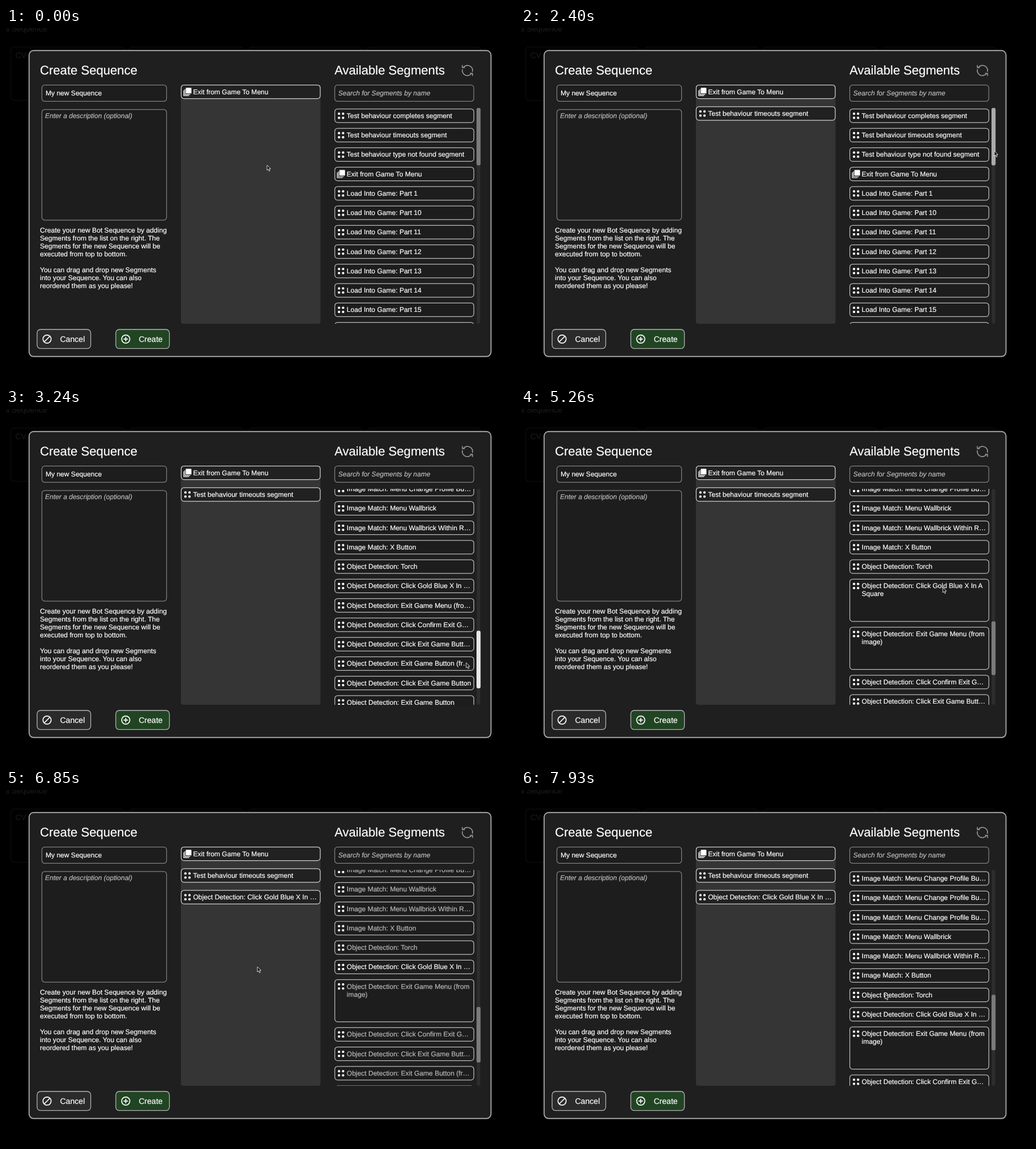
Recreate the animation shown at these times as an HTML page with a canvas. Size 899 by 623 pixels, loop 7990 ms.

```html
<!DOCTYPE html>
<html lang="en">
<head>
<meta charset="utf-8">
<title>Create Sequence</title>
<style>
  html, body { margin: 0; width: 100%; height: 100%; overflow: hidden; background: #000; }
  canvas { display: block; width: 899px; height: 623px; }
</style>
</head>
<body>
<canvas id="stage" width="899" height="623"></canvas>
<script>
const ctx = document.getElementById('stage').getContext('2d');
const LOOP = 7990;
const FONT = '"Liberation Sans", Arial, sans-serif';
const SIZE = 12.05, CARD = 24, PITCH = 34.25, EXTRA = 50.5;
const LIST = { x: 580.3, y: 141, height: 381, first: 154.8 };
const PANEL = { x: 309, y: 100, first: 112.6, pitch: 38.25 };
const LIGHT = '#fff', EDGE = '#818181', FIELD = '#1d1d1d';

const parts = Array.from({ length: 19 }, (_, i) => String(i + 1)).sort();
const segments = [
  'Test behaviour completes segment',
  'Test behaviour timeouts segment',
  'Test behaviour type not found segment',
  'Exit from Game To Menu',
  ...parts.map(n => 'Load Into Game: Part ' + n),
  ...Array(5).fill('Image Match: Menu Change Profile Bu…'),
  'Image Match: Menu Wallbrick',
  'Image Match: Menu Wallbrick Within R…',
  'Image Match: X Button',
  'Object Detection: Torch',
  'Object Detection: Click Gold Blue X In …',
  'Object Detection: Exit Game Menu (fro…',
  'Object Detection: Click Confirm Exit G…',
  'Object Detection: Click Exit Game Butt…',
  'Object Detection: Exit Game Button (fr…',
  'Object Detection: Click Exit Game Button',
  ...Array(4).fill('Object Detection: Exit Game Button')
];
const TIMEOUTS = segments.indexOf('Test behaviour timeouts segment');
const GOLD = segments.findIndex(s => s.includes('Gold'));

const expanded = [
  { item: GOLD, start: 5130, end: 6380, lines: ['Object Detection: Click Gold Blue X In A', 'Square'] },
  { item: GOLD + 1, start: 4190, end: LOOP, lines: ['Object Detection: Exit Game Menu (from', 'image)'] }
];
const drags = [
  { item: TIMEOUTS, start: 540, end: 1270, slot: 1, dx: 8.5 },
  { item: GOLD, start: 6380, end: 6780, slot: 2, dx: -8.5 }
];
const barDrag = { start: 2480, end: 2910, distance: 938.5 };
const wheel = { start: 7640, end: 7910, distance: -83.5 };

// Pointer strokes: start, end, and where the tip comes to rest.
const home = [461, 242];
const moves = [
  [120, 500, 695, 190],
  [560, 940, 478, 212],
  [1300, 1740, 823, 189],
  [1740, 2100, 841, 188],
  [2280, 2400, 836, 217],
  [barDrag.start, barDrag.end, 836, 466],
  [3150, 3480, 711, 368],
  [3600, 3780, 711, 354],
  [4800, 5200, 745, 315],
  [5440, 5850, 675, 478],
  [5850, 6210, 712, 315],
  [6380, 6800, 444, 312],
  [7030, 7210, 693, 40],
  [7340, 7510, 643, 360]
];

const ramp = (t, a, b) => Math.max(0, Math.min(1, (t - a) / (b - a)));
const ease = (t, a, b) => { const p = ramp(t, a, b); return p * p * (3 - 2 * p); };
const during = (t, span) => t >= span.start && t < span.end;
const gray = v => `rgb(${v},${v},${v})`;

function cursorAt(t) {
  return moves.reduce(([x, y], [a, b, toX, toY]) => {
    const p = ease(t, a, b);
    return [x + (toX - x) * p, y + (toY - y) * p];
  }, home);
}
const scrollAt = t => [barDrag, wheel].reduce((sum, s) => sum + s.distance * ease(t, s.start, s.end), 0);

function box(x, y, w, h, r, fill, stroke, width = 1.25) {
  ctx.beginPath();
  ctx.roundRect(x, y, w, h, r);
  if (fill) { ctx.fillStyle = fill; ctx.fill(); }
  if (stroke) { ctx.strokeStyle = stroke; ctx.lineWidth = width; ctx.stroke(); }
}
// y is the middle of the line; a hairline stroke gives the slightly heavier weight.
function text(s, x, y, size = SIZE, color = LIGHT, style = '') {
  const base = y + size * .3465;
  ctx.font = `${style} ${size}px ${FONT}`;
  ctx.fillStyle = ctx.strokeStyle = color;
  ctx.lineWidth = .2;
  ctx.fillText(s, x, base);
  ctx.strokeText(s, x, base);
}
function line(points, color, width) {
  ctx.beginPath();
  points.forEach(([x, y]) => ctx.lineTo(x, y));
  ctx.strokeStyle = color;
  ctx.lineWidth = width;
  ctx.stroke();
}
function arc(x, y, r, from, to, color, width) {
  ctx.beginPath();
  ctx.arc(x, y, r, from, to);
  ctx.strokeStyle = color;
  ctx.lineWidth = width;
  ctx.stroke();
}

function dots(x, y, color) {
  for (const dx of [-3.6, 3.6]) for (const dy of [-3.6, 3.6])
    box(x + dx - 2, y + dy - 2, 4, 4, 1.5, color);
}
function stack(x, y, color) {
  box(x - 3, y - 7, 10, 10, 1.2, color);
  for (const d of [0, 2])
    line([[x - 4.6 - d, y - 4.6 + d], [x - 4.6 - d, y + 4.7 + d], [x + 4.8 - d, y + 4.7 + d]], color, 1.2);
}

// A segment card; y is the middle of its first line.
function card(x, y, lines, { h = CARD, fill = FIELD, border = '#bcbcbc', ink = 255, icon = 255 } = {}) {
  box(x + .4, y - CARD / 2, 245.6, h, 5, fill, border);
  (lines[0].startsWith('Exit from') ? stack : dots)(x + 11.5, y, gray(icon));
  lines.forEach((s, i) => text(s, x + 21.5, y + i * 14, SIZE, gray(ink)));
}

function background() {
  ctx.fillStyle = '#000';
  ctx.fillRect(0, 0, 899, 623);
  text('a Sequence', -2, 1.5, 14, '#1b1b1b');
  for (let i = 0; i < 4; i++) box(8.5 + i * 210, 33.5, 200, 94, 6, null, '#0e0e0e');
  text('CV', 16.5, 48, 14, '#191919');
}

function refreshIcon(x, y) {
  const color = '#999', width = 1.6;
  for (const turn of [0, Math.PI]) {
    ctx.save();
    ctx.translate(x, y);
    ctx.rotate(turn);
    arc(0, 0, 9, Math.PI * 1.2, Math.PI * 2.08, color, width);
    line([[-9, -9.5], [-9, -5], [-4.5, -5]], color, width);
    ctx.restore();
  }
}

function button(x, label, fill, drawIcon) {
  box(x, 532, 94.7, 33.7, 6, fill, '#b4b4b4', 1.3);
  arc(x + 17.6, 549, 7.2, 0, 7, LIGHT, 1.7);
  drawIcon(x + 17.6, 549);
  text(label, x + 40.5, 549, 14.1);
}

function dialog() {
  box(40.8, 39.8, 815.8, 540, 8, '#1f1f1f', '#a6a6a6', 1.9);
  text('Create Sequence', 60, 74.8, 22.1);
  text('Available Segments', 580.2, 74.8, 22.1);
  refreshIcon(815, 75);

  box(63.4, 100.7, 220.2, 28.7, 5, FIELD, EDGE);
  text('My new Sequence', 70, 115);
  box(63.4, 143.8, 220.2, 195.2, 5, FIELD, EDGE);
  text('Enter a description (optional)', 69, 155, SIZE, '#bbb', 'italic');
  box(580.6, 100.7, 245.6, 28.7, 5, FIELD, EDGE);
  text('Search for Segments by name', 586.7, 115, SIZE, '#bbb', 'italic');

  ['Create your new Bot Sequence by adding', 'Segments from the list on the right. The',
   'Segments for the new Sequence will be', 'executed from top to bottom.', '',
   'You can drag and drop new Segments', 'into your Sequence. You can also',
   'reordered them as you please!'
  ].forEach((s, i) => text(s, 60, 357.2 + i * 13.93, 12.1));

  button(54.9, 'Cancel', '#2b2b2b', (x, y) => line([[x - 5, y + 5], [x + 5, y - 5]], LIGHT, 1.7));
  button(193.9, 'Create', '#214523', (x, y) => {
    line([[x - 4, y], [x + 4, y]], LIGHT, 1.7);
    line([[x, y - 4], [x, y + 4]], LIGHT, 1.7);
  });
}

function sequence(t, [cursorX]) {
  box(PANEL.x, PANEL.y, 246.5, 422, 4, '#353535');
  const style = { fill: '#212121', border: '#d0d0d0' };
  card(PANEL.x, PANEL.first, ['Exit from Game To Menu'], style);
  for (const d of drags) {
    const y = PANEL.first + d.slot * PANEL.pitch;
    if (t >= d.end) card(PANEL.x, y, [segments[d.item]], style);
    else if (during(t, d) && cursorX < LIST.x) {
      ctx.setLineDash([7, 3]);
      box(PANEL.x + .4, y - CARD / 2, 245.6, CARD, 5, '#2b2b2b', '#c4c4c4');
      ctx.setLineDash([]);
    }
  }
}

function scrollbar(t, scroll, openCount) {
  const content = segments.length * PITCH - 10 + openCount * EXTRA;
  const height = LIST.height ** 2 / content;
  const top = LIST.y + (LIST.height - height) * scroll / (content - LIST.height);
  const hover = 48 * ramp(t, 2300, 2390), press = 60 * ramp(t, 2480, 2570);
  const shade = 122 + (hover + press) * (1 - ramp(t, 3260, 3430));
  box(831.5, LIST.y, 6, LIST.height, 3, '#2d2d2d');
  box(831, top, 7.2, height, 3, gray(Math.round(shade)));
}

function segmentList(t) {
  const drag = drags.find(d => t >= d.start && t < d.end + 150);
  const held = drag && during(t, drag);
  const dim = drag ? ramp(t, drag.start, drag.start + 120) * (1 - ramp(t, drag.end, drag.end + 150)) : 0;
  const scroll = scrollAt(t);
  const open = expanded.filter(e => during(t, e));

  ctx.save();
  ctx.beginPath();
  ctx.rect(579, LIST.y, 250, LIST.height);
  ctx.clip();
  let y = LIST.first - scroll;
  segments.forEach((name, i) => {
    const wide = open.find(e => e.item === i);
    const h = CARD + (wide ? EXTRA : 0);
    const faded = drag && drag.item !== i;
    const ink = faded ? Math.round(255 - 133 * dim) : 255;
    card(LIST.x, y, wide ? wide.lines : [name], { h, ink, icon: held ? ink : 255 });
    y += PITCH - CARD + h;
  });
  ctx.restore();
  scrollbar(t, scroll, open.length);
}

function ghost(t, [x, y]) {
  const drag = drags.find(d => during(t, d));
  if (!drag) return;
  ctx.save();
  ctx.translate(x + drag.dx, y - 2);
  ctx.rotate(-5 * Math.PI / 180 * ramp(t, drag.start, drag.start + 100));
  ctx.globalAlpha = .7;
  card(-123, 0, [segments[drag.item]], { fill: null, border: '#989898' });
  ctx.restore();
}

function pointer([x, y]) {
  ctx.save();
  ctx.translate(x, y);
  const shape = new Path2D('M0 0V9L2.1 7.2 3.6 10.6 5.1 9.9 3.7 6.6 6.4 6.4Z');
  ctx.fillStyle = '#151515';
  ctx.fill(shape);
  ctx.strokeStyle = '#e6e6e6';
  ctx.lineWidth = .9;
  ctx.stroke(shape);
  ctx.restore();
}

function draw(t) {
  const cursor = cursorAt(t);
  ctx.textRendering = 'geometricPrecision';
  ctx.lineJoin = 'round';
  background();
  dialog();
  sequence(t, cursor);
  segmentList(t);
  ghost(t, cursor);
  pointer(cursor);
}

const begin = performance.now();
function frame() {
  draw((performance.now() - begin) % LOOP);
  requestAnimationFrame(frame);
}
frame();
</script>
</body>
</html>
```
